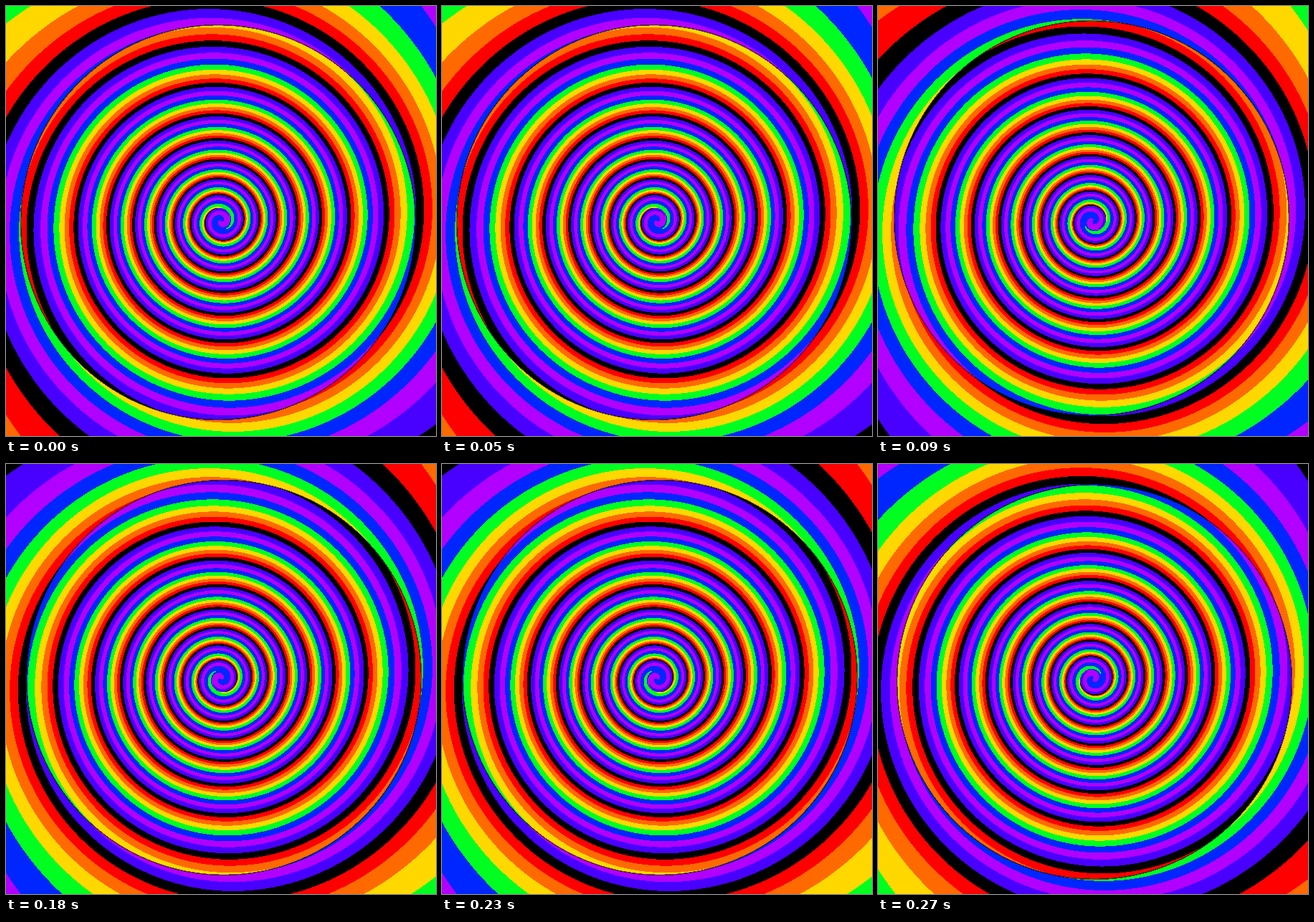
Write an HTML page with a canvas that moves like this. It is 600x600 px and loops after 0.36 s.

```html
<!DOCTYPE html>
<html lang="en">
<head>
<meta charset="utf-8">
<title>Rainbow spiral</title>
<style>
  html, body { margin: 0; width: 100%; height: 100%; overflow: hidden; background: #000; }
  canvas { display: block; width: 600px; height: 600px; transform-origin: 50% 50%; }
</style>
</head>
<body>
<canvas id="spiral" width="600" height="600"></canvas>
<script>
  const SIZE = 600, MID = SIZE / 2, TAU = 2 * Math.PI;

  // A wheel of eight wedges, its hub off the middle, twisted around the middle.
  const HUB_OFFSET = 18;
  const TWIST = { turns: 9, radius: 515 };

  // The inner disc is the same picture turned by a fixed amount.
  const DISC = { x: 296, y: 302, r: 275.4 };
  const INNER_START = 0.588, OUTER_START = 0.957;

  // Wedge colours in order.
  const bands = ['000000', 'ff0000', 'ff6a00', 'ffd800', '00ff21', '0026ff', 'b200ff', '4800ff']
    .map(hex => [0, 2, 4].map(i => parseInt(hex.slice(i, i + 2), 16)));

  const wrap = v => v - Math.floor(v);

  function colorAt(r, angle, start) {
    const twist = TWIST.turns * (1 - r / TWIST.radius) ** 3;
    const a = (start - twist) * TAU - angle;
    const wedge = Math.atan2(r * Math.sin(a) - HUB_OFFSET, r * Math.cos(a)) / TAU;
    return bands[Math.floor(wrap(wedge) * 8) % 8];
  }

  function paint(ctx) {
    const image = ctx.createImageData(SIZE, SIZE);
    for (let py = 0, at = 0; py < SIZE; py++) {
      for (let px = 0; px < SIZE; px++, at += 4) {
        const x = px + 0.5, y = py + 0.5;
        const r = Math.hypot(x - MID, y - MID);
        const angle = Math.atan2(MID - y, x - MID);
        const edge = Math.hypot(x - DISC.x, y - DISC.y) - DISC.r;
        const shade = Math.abs(edge) < 0.8 ? 0.45 : 1;
        const color = colorAt(r, angle, edge < 0 ? INNER_START : OUTER_START);
        for (let c = 0; c < 3; c++) image.data[at + c] = color[c] * shade;
        image.data[at + 3] = 255;
      }
    }
    ctx.putImageData(image, 0, 0);
  }

  const canvas = document.getElementById('spiral');
  paint(canvas.getContext('2d'));

  // Four hard quarter turns per loop.
  canvas.animate(
    { transform: ['rotate(0deg)', 'rotate(360deg)'] },
    { duration: 360, iterations: Infinity, easing: 'steps(4, end)' }
  );
</script>
</body>
</html>
```
